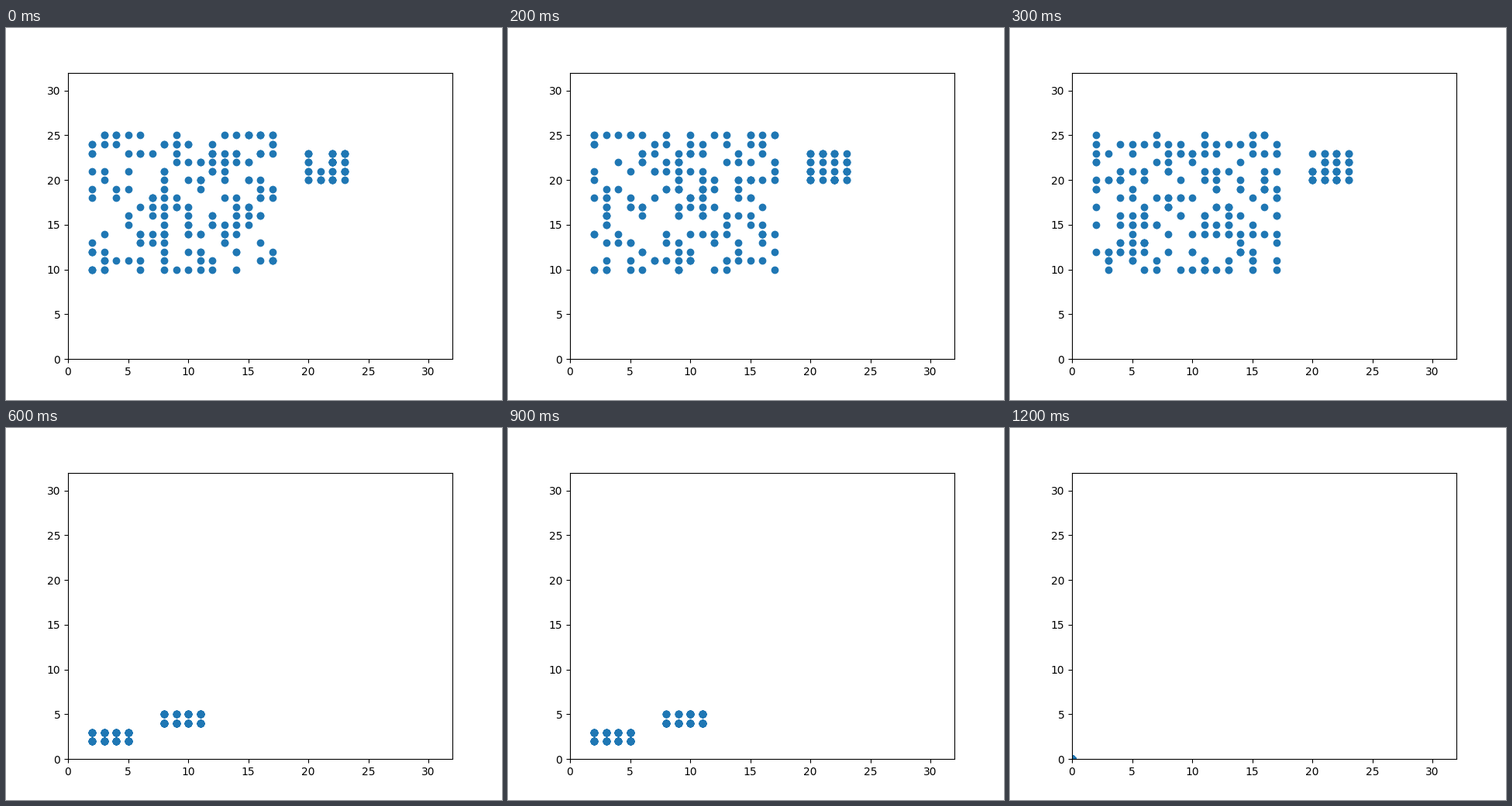
Write a matplotlib script that moves like this. It is 640 by 480 pixels and loops after 1.24 s.

```python
import matplotlib.pyplot as plt
import numpy as np
from matplotlib.animation import FuncAnimation

TICK, STEP, LOOP = 20, 100, 1240  # ms
SIZE = 32

# Regions as (x0, x1, y0, y1, points), bounds inclusive
FIELD = [(2, 17, 10, 25, 180), (20, 23, 20, 23, 42)]
BLOCKS = [(2, 5, 2, 3, 80), (8, 11, 4, 5, 80)]
ORIGIN = [(0, 0, 0, 0, 160)]


def regions(step):
    if step < 4:
        return FIELD
    return BLOCKS if step < 12 else ORIGIN


def scatter_points(step):
    rng = np.random.default_rng(step)
    parts = [
        (rng.integers(x0, x1 + 1, n), rng.integers(y0, y1 + 1, n))
        for x0, x1, y0, y1, n in regions(step)
    ]
    return np.hstack(parts)


fig, ax = plt.subplots(figsize=(6.4, 4.8), dpi=100)
ax.set_xlim(0, SIZE)
ax.set_ylim(0, SIZE)
dots, = ax.plot([], [], "o", color="C0")

steps = [scatter_points(s) for s in range(LOOP // STEP + 1)]


def update(frame):
    dots.set_data(*steps[frame * TICK // STEP])
    return dots,


anim = FuncAnimation(fig, update, frames=LOOP // TICK, interval=TICK,
                     repeat=True, repeat_delay=0)
plt.show()
```
